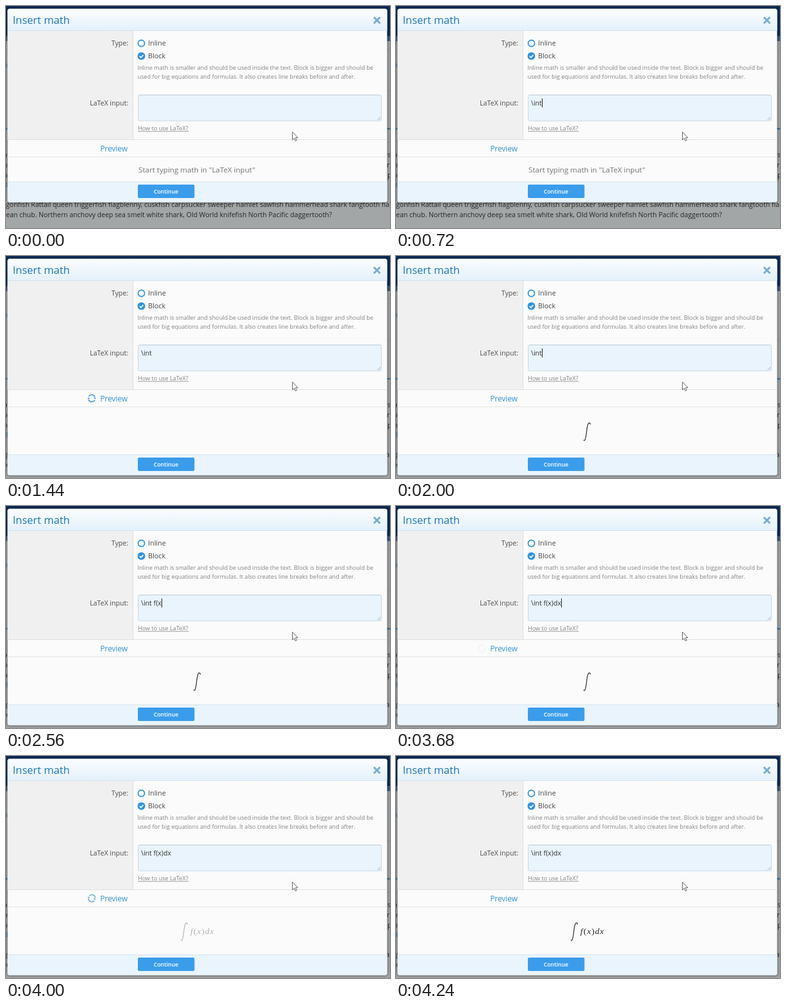
Animation of 600 by 348 pixels, one loop 4320 ms. Source, as an HTML page:

```html
<!DOCTYPE html>
<html lang="en">
<head>
<meta charset="utf-8">
<title>Insert math</title>
<style>
html, body { margin: 0; width: 100%; height: 100%; overflow: hidden; background: #a3a6a7; }
svg { display: block; width: 100vw; height: 100vh; }
text { font-family: "Open Sans", "Noto Sans", sans-serif; white-space: pre; }
.page { font-size: 10.55px; fill: #262626; }
.label { font-size: 10.6px; fill: #4c4c4c; text-anchor: end; }
.option { font-size: 10.8px; fill: #484848; }
.help { font-size: 9.15px; fill: #848484; }
.math { font: italic 13.5px "Liberation Serif", serif; fill: #222; }
</style>
</head>
<body>
<svg viewBox="0 0 600 348" preserveAspectRatio="none">
  <defs>
    <linearGradient id="head" x2="0" y2="1">
      <stop offset="0" stop-color="#fbfdff"/>
      <stop offset="1" stop-color="#e4f1fb"/>
    </linearGradient>
    <filter id="blur" x="-5%" y="-5%" width="110%" height="110%">
      <feGaussianBlur stdDeviation="2.5"/>
    </filter>
    <clipPath id="clip"><rect id="clipBox" x="2.5" y="4.5" width="593" height="303" rx="3"/></clipPath>
    <path id="integral" d="M10.6 2.6C10.8 1 9.2 .1 7.9 1.2C6.3 2.5 5.8 6.5 5.1 12C4.2 19 3.6 25.2 2.2 27.5C1.5 28.6 .6 28.4 .5 27.6"
      fill="none" stroke="#222" stroke-width="1.15" stroke-linecap="round"/>
    <g id="arrow">
      <path d="M-5.4 1.2A5.5 5.5 0 0 1 2.4 -4.9" fill="none" stroke="#3d99df" stroke-width="1.6"/>
      <path d="M4.8 -5.2L4.4 -2L1.4 -3Z" fill="#3d99df"/>
    </g>
  </defs>

  <!-- dimmed page -->
  <rect width="600" height="348" fill="#a3a6a7"/>
  <rect width="600" height="47" fill="#0c2c56"/>
  <rect y="47" width="600" height="8" fill="#40587a"/>
  <path d="M0 67.500H600M0 132.500H600M0 213.500H600" stroke="#959899"/>
  <rect y="191.500" width="600" height="2" fill="#1d6ba6"/>
  <g class="page">
    <text x="596" y="237">sh</text>
    <text x="595" y="253">rk</text>
    <text x="596" y="269">p</text>
    <text x="-4" y="237">a</text>
    <text x="-4" y="253">b</text>
    <text x="-4" y="269">b</text>
    <text x="0" y="284" fill="#1d6ba6">l</text>
    <text x="-4" y="96" fill="#1d6ba6">n</text>
    <text x="0" y="314.500">gonfish Rattail queen triggerfish flagblenny, cuskfish carpsucker sweeper hamlet sawfish hammerhead shark fangtooth flab</text>
    <text x="0" y="330.500">ean chub. Northern anchovy deep sea smelt white shark, Old World knifefish North Pacific daggertooth?</text>
  </g>

  <!-- dialog -->
  <rect id="shadow" x="2" y="5" width="594" height="303" rx="4" opacity=".5" filter="url(#blur)"/>
  <g clip-path="url(#clip)">
    <rect x="2" y="4" width="594" height="341" fill="#fbfbfb"/>
    <rect x="2" y="4" width="594" height="34" fill="url(#head)"/>
    <rect x="2" y="38" width="594" height="1" fill="#d3e2ee"/>
    <text x="10.500" y="28" font-size="16.5" fill="#1c77b7">Insert math</text>
    <path d="M575.800 18.500L583.400 26.200M583.400 18.500L575.800 26.200" stroke="#78adD2" stroke-width="3" stroke-linecap="square"/>

    <rect x="2" y="39" width="196" height="170" fill="#f0f0f0"/>
    <rect x="198" y="39" width="1" height="170" fill="#dedede"/>
    <rect x="2" y="209" width="594" height="1" fill="#e0e0e0"/>
    <rect x="2" y="236" width="594" height="1" fill="#e5e5e5"/>

    <text class="label" x="191" y="62">Type:</text>
    <text class="label" x="191" y="156">LaTeX input:</text>

    <circle cx="211.500" cy="58.500" r="5" fill="#fff" stroke="#3297e4" stroke-width="1.900"/>
    <circle cx="211.500" cy="78.500" r="6" fill="#2f93e0"/>
    <path d="M208.700 78.700L210.800 80.800L214.500 76.700" fill="none" stroke="#fff" stroke-width="1.700"/>
    <text class="option" x="222" y="62">Inline</text>
    <text class="option" x="222" y="82">Block</text>
    <text class="help" x="205.400" y="100">Inline math is smaller and should be used inside the text. Block is bigger and should be</text>
    <text class="help" x="205.400" y="113.500">used for big equations and formulas. It also creates line breaks before and after.</text>

    <rect x="206.500" y="139.500" width="380" height="40.500" rx="2" fill="#e9f4fd" stroke="#c9d7e2"/>
    <path d="M208 139.500H585" stroke="#bccad5"/>
    <path d="M580.500 178.500L585 174M583.500 178.500L585 177" stroke="#8d9aa5" stroke-width=".8"/>
    <text id="input" class="label" x="211" y="156" style="text-anchor:start;fill:#333"></text>
    <rect id="caret" y="145" width="1" height="14" fill="#222"/>

    <text class="help" x="206" y="195">How to use LaTeX?</text>
    <rect x="206" y="196.300" width="79.500" height=".8" fill="#8c8c8c"/>

    <g id="spinner">
      <use href="#arrow"/>
      <use href="#arrow" transform="rotate(180)"/>
    </g>
    <text x="190" y="228" font-size="11.9" text-anchor="end" fill="#3490d6">Preview</text>
    <text id="hint" x="207" y="261" font-size="11.63" fill="#747474">Start typing math in "LaTeX input"</text>
    <g id="formula">
      <use id="sign" href="#integral"/>
      <text id="integrand" class="math" y="279" x="288 293 298.500 305.500 311 318.500">f<tspan font-style="normal">(</tspan>x<tspan font-style="normal">)</tspan>dx</text>
    </g>

    <g id="footer">
      <rect x="2" y="275" width="594" height="36" fill="#e9f4fc"/>
      <rect x="2" y="275" width="594" height="1" fill="#d9e6f0"/>
      <rect x="206" y="280" width="88.500" height="21" rx="2" fill="#3a9ceb"/>
      <text x="250" y="293.800" font-size="8.8" font-weight="600" text-anchor="middle" fill="#fff">Continue</text>
    </g>
  </g>

  <path d="M447.500 197.500V209.800L450.300 207.200L452.200 211.500L454.200 210.600L452.300 206.400H456Z"
    fill="#fff" stroke="#555" stroke-width=".9" stroke-linejoin="round"/>
</svg>
<script>
const LOOP = 4320, STEP = 80;
const CODE = "\\int f(x)dx";
const KEYS = [320, 560, 640, 720, 2240, 2400, 2480, 2560, 2720, 3040, 3200];
const LOADS = [1200, 3680];
const BLINK = 530;
const $ = id => document.getElementById(id);
const clamp = v => Math.max(0, Math.min(1, v));
const show = (id, v) => $(id).setAttribute("opacity", +v);
const set = (id, name, v) => $(id).setAttribute(name, v);

function drawInput(t) {
  const count = KEYS.filter(k => k <= t).length;
  const input = $("input");
  input.textContent = CODE.slice(0, count);
  const width = count ? input.getComputedTextLength() : 0;
  set("caret", "x", Math.round(211 + width));
  const last = count ? KEYS[count - 1] : 240;
  const on = t >= 240 && Math.floor((t - last + 10) / BLINK) % 2 === 0;
  show("caret", on && t < 4240);
}

function drawPreview(t) {
  const start = LOADS.filter(k => k <= t).pop();
  const idle = start === undefined;
  const age = idle ? -1 : t - start;
  const cleared = age >= STEP;
  const second = start === LOADS[1] && cleared;
  const kept = start === LOADS[1] && !cleared;

  const drop = kept || age >= 240 ? 36 : 0;
  set("footer", "transform", `translate(0 ${drop})`);
  set("clipBox", "height", 303 + drop);
  set("shadow", "height", 303 + drop);

  show("hint", idle || (start === LOADS[0] && !cleared));
  show("formula", kept ? 1 : clamp((age - 240) / 240));
  show("integrand", second);
  set("sign", "transform", `translate(${second ? 273 : 293} 261)`);

  const fade = idle ? 0 : Math.min(clamp(0.08 + age / 90), clamp((440 - age) / 160));
  show("spinner", fade);
  set("spinner", "transform", `translate(134 223) rotate(${age * 0.18})`);
}

const origin = performance.now();
function tick() {
  const now = performance.now() - origin;
  const t = Math.floor((now % LOOP) / STEP) * STEP;
  drawInput(t);
  drawPreview(t);
  requestAnimationFrame(tick);
}
tick();
</script>
</body>
</html>
```
